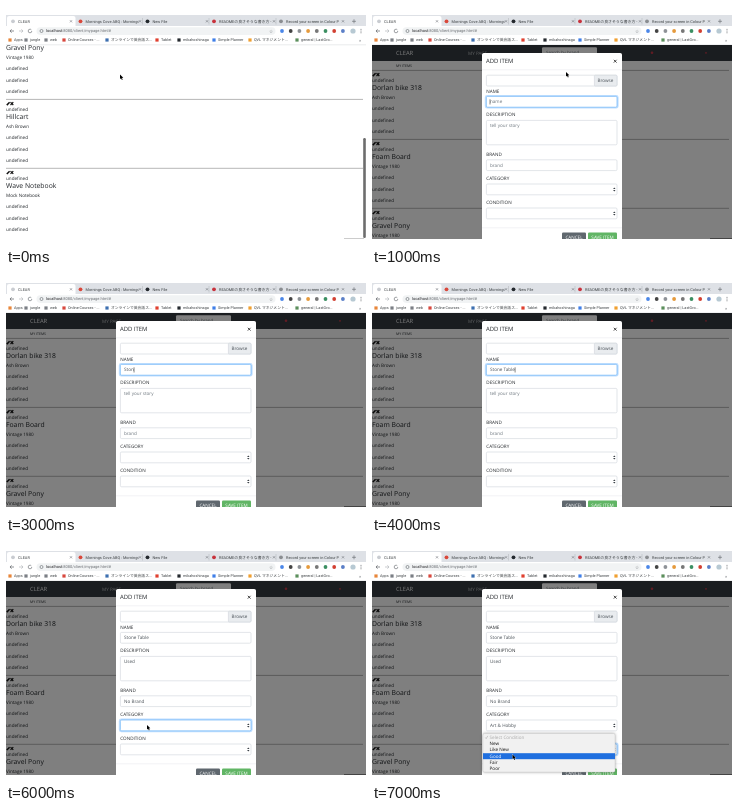
Animation of 360x240 px, one loop 8 s. Source, as an HTML page:

```html
<!DOCTYPE html>
<html lang="en">
<head>
<meta charset="utf-8">
<title>Add item</title>
<style>
html, body { margin: 0; width: 100%; height: 100%; overflow: hidden; background: #fff; }
#stage { display: block; width: 360px; height: 240px; }
text { text-rendering: geometricPrecision; white-space: pre; }
</style>
</head>
<body>
<svg id="stage" viewBox="0 0 360 240">
  <defs>
    <filter id="grain" x="0" y="0" width="1" height="1" color-interpolation-filters="sRGB">
      <feTurbulence type="fractalNoise" baseFrequency="0.85" numOctaves="2" seed="11"/>
      <feColorMatrix values="1.1 .3 .3 0 -.4  .3 1.1 .3 0 -.4  .3 .3 1.1 0 -.4  0 0 0 0 1"/>
    </filter>
  </defs>
  <g id="scene"></g>
</svg>
<script>
const scene = document.getElementById('scene');
let parent = scene;

const PAGE = '"Open Sans", "Noto Sans", sans-serif';
const UI = 'Roboto, "Noto Sans CJK JP", "Noto Sans CJK", sans-serif';
const INK = '#212529';

function add(tag, attributes) {
  const node = document.createElementNS('http://www.w3.org/2000/svg', tag);
  for (const key in attributes) node.setAttribute(key, attributes[key]);
  return parent.appendChild(node);
}

function inside(node, draw) {
  const outer = parent;
  parent = node;
  draw();
  parent = outer;
}

// A nested viewport clips its content
function clipped(x, y, width, height, draw) {
  inside(add('svg', { x, y, width, height, viewBox: `${x} ${y} ${width} ${height}` }), draw);
}

// y is the visual middle of the line; returns the x where the text ends
function text(str, x, y, size = 4.6, fill = INK, font = PAGE, anchor = 'start') {
  const node = add('text', {
    x, y: y + size * 0.34, fill, 'font-size': size, 'font-family': font, 'text-anchor': anchor
  });
  node.textContent = str;
  return x + node.getComputedTextLength();
}

function rect(x, y, width, height, fill) {
  return add('rect', { x, y, width, height, fill });
}

function box(x, y, width, height, rx, fill, stroke, weight = 0.6) {
  return add('rect', {
    x, y, width, height, rx, fill: fill || 'none', stroke: stroke || 'none', 'stroke-width': weight
  });
}

function dot(cx, cy, r, fill) {
  add('circle', { cx, cy, r, fill });
}

function ring(cx, cy, r) {
  return add('circle', { cx, cy, r, fill: 'none', stroke: '#5f6368', 'stroke-width': 0.6 });
}

function line(stroke, weight, ...points) {
  add('polyline', { points: points.join(' '), fill: 'none', stroke, 'stroke-width': weight });
}

function cross(x, y, r, color, weight = 0.6) {
  line(color, weight, x - r, y - r, x + r, y + r);
  line(color, weight, x - r, y + r, x + r, y - r);
}

function triangle(x, y, r, dir, fill) {
  add('polygon', { points: [x - r, y, x + r, y, x, y + dir * r * 1.3].join(' '), fill });
}

function updown(x, y, color = '#343a40') {
  triangle(x, y - 0.5, 1.2, -1, color);
  triangle(x, y + 0.5, 1.2, 1, color);
}

function pointer(x, y) {
  add('path', {
    d: `M${x} ${y}v4.6l1.1-.9 .8 1.7 .8-.4-.8-1.6 1.4-.1z`,
    fill: '#000', stroke: '#fff', 'stroke-width': 0.6, 'paint-order': 'stroke'
  });
}

function beam(x, y) {
  line('#111', 0.7, x, y - 2.4, x, y + 2.4);
  for (const dy of [-2.6, 2.6]) line('#111', 0.6, x - 1.2, y + dy, x + 1.2, y + dy);
}

function shadow(node, blur, alpha) {
  node.style.filter = `drop-shadow(0 0 ${blur}px rgba(0,0,0,${alpha}))`;
}

const TABS = [
  [7, 'CLEAR', '#c9ccd1', 65],
  [74.5, 'Mornings Cove ABQ : Mornings', '#d9483b', 134],
  [141.5, 'New File', '#24292e', 201],
  [208, 'READMEの良さそうな書き方 - Q', '#c8323c', 268],
  [275, 'Record your screen in Colour P', '#8a8d91', 337]
];
const BOOKMARKS = [
  [4, 'Apps', '#e8863a'], [20, 'jungle', '#7b7f85'], [40, 'web', '#7b7f85'],
  [58, 'Online Courses - ...', '#d8483e'], [101, 'オンラインで英会話ス...', '#3d6fb0'],
  [151, 'Tablet', '#e0402f'], [173, 'mikahoshinaga', '#24292e'],
  [208, 'Simple Planner', '#3f7fe8'], [244, 'QVL マネジメント...', '#f0a030'],
  [291, 'general | LastGro...', '#5b8f5c']
];
const EXTENSIONS = ['#4a86e8', '#444', '#8e9297', '#e59a3c', '#777', '#3b8f62', '#d23f31', '#5b7fc7'];

function browser() {
  rect(0, 0, 360, 240, '#fff');
  rect(0, 9, 360, 11, '#dee1e6');
  box(1, 10, 68.5, 13, 2, '#fff');
  rect(0, 20, 360, 19, '#fff');
  for (const [x, label, color, close] of TABS) {
    dot(x, 15.3, 1.9, color);
    clipped(x + 4, 10, 54, 10, () => text(label, x + 5, 15.3, 3.9, '#3c4043', UI));
    cross(close, 15.3, 1.1, '#5f6368', 0.5);
    if (x > 80) line('#a5a8ad', 0.4, x - 5, 12, x - 5, 18.5);
  }
  line('#5f6368', 0.6, 346, 15.3, 350, 15.3);
  line('#5f6368', 0.6, 348, 13.3, 348, 17.3);

  for (const [x, d] of [[6, -1], [15, 1]]) {
    const color = d < 0 ? '#5f6368' : '#b5b8bc';
    line(color, 0.7, x - 2, 25, x + 2, 25);
    line(color, 0.7, x + d * 0.4, 23.3, x + d * 2, 25, x + d * 0.4, 26.7);
  }
  ring(24, 25, 1.8).setAttribute('stroke-dasharray', '9 2.3');
  box(30.5, 21.3, 239, 7.6, 3.8, '#f1f3f4');
  ring(35.5, 25, 1.5);
  const port = text('localhost:', 40, 25, 4, '#202124', UI);
  text('8080/client/mypage.html#', port, 25, 4, '#6a6e73', UI);
  text('☆', 263, 25, 4.6, '#5f6368', '"DejaVu Sans", sans-serif');
  EXTENSIONS.forEach((color, i) => dot(276 + i * 8.7, 25, 1.9, color));
  dot(347, 25, 2.6, '#b7c9d3');
  for (let y = 23.3; y < 27; y += 1.7) dot(355, y, 0.5, '#5f6368');

  for (const [x, label, color] of BOOKMARKS) {
    rect(x - 1.6, 32.4, 3.2, 3.2, color);
    text(label, x + 4, 34, 3.8, '#3c4043', UI);
  }
  text('»', 353, 34, 4.5, '#5f6368', UI);
  line('#d5d7da', 0.5, 0, 38.8, 360, 38.8);
}

function entry(top, title, note) {
  line('#858585', 0.6, 0, top, 357, top);
  line('#111', 1.5, 0.8, top + 5.7, 3.6, top + 2.9);
  cross(5.9, top + 4.2, 1.4, '#111', 1.1);
  text('undefined', 0, top + 10);
  text(title, 0, top + 17.4, 6.8);
  text(note, 0, top + 27.2);
  for (const dy of [38.4, 49.8, 61.2]) text('undefined', 0, top + dy);
}

function scrolledPage() {
  clipped(0, 39, 360, 194, () => {
    entry(24.4, 'Gravel Pony', 'Vintage 1980');
    entry(93.4, 'Hillcart', 'Ash Brown');
    entry(162.3, 'Wave Notebook', 'Mock Notebook');
  });
  box(357.2, 132, 2.6, 100, 1.2, '#6d6d6d');
  rect(338, 232, 20, 1, '#ccc');
}

function dimmedPage() {
  clipped(0, 39, 360, 194, () => {
    entry(64.4, 'Dorlan bike 318', 'Ash Brown');
    entry(133.4, 'Foam Board', 'Vintage 1980');
    entry(202.3, 'Gravel Pony', 'Vintage 1980');
    text('MY ITEMS', 24, 59.4, 3.5);
    rect(0, 39, 360, 16, '#343a40');
    text('CLEAR', 24, 47, 5.8, '#fff');
    text('MY PAGE', 96, 47, 4.6, '#c3c5c8');
    box(170, 41.3, 55, 11, 1.2, '#fff');
    text('Search by brand', 174, 47, 4.4, '#6c757d');
    dot(280, 46.8, 1.3, '#c33745');
    dot(334, 46.8, 0.9, '#c33745');
    rect(0, 39, 360, 194, 'rgba(0,0,0,.5)');
    rect(338, 232, 22, 1, '#444');
  });
}

function field(y, h, value, { hint = '', focus = false, caret = false, select = false } = {}) {
  if (focus) box(113.6, y - 0.6, 132.2, h + 1.2, 1.6, null, '#bfdeff', 1.6);
  box(114.4, y, 130.6, h, 1.2, '#fff', focus ? '#5aa9f5' : '#ced4da');
  const mid = y + 5.5;
  const end = text(value || hint, 118, mid, 4.6, value ? '#495057' : '#6c757d');
  if (caret) {
    const x = value ? end + 0.3 : 118;
    line('#111', 0.5, x, mid - 2.6, x, mid + 2.6);
  }
  if (select) updown(242.3, mid);
}

function modal({ name = '', story = '', brand = '', category = '', focus }) {
  clipped(0, 39, 360, 194, () => {
    box(110, 47, 140, 195, 1.8, '#fff');
    text('ADD ITEM', 114, 55.2, 5.9);
    cross(243.2, 55.2, 1.4, '#333', 0.9);
    line('#e4e7ea', 0.5, 110, 63.8, 250, 63.8);
    box(114.4, 69.2, 130.6, 10.8, 1.2, '#fff', '#ced4da');
    box(222.4, 69.2, 22.6, 10.8, 1, '#e9ecef', '#ced4da');
    text('Browse', 225.5, 74.6, 4.6, '#495057');
    text('NAME', 114.3, 85.3);
    text('DESCRIPTION', 114.3, 108.8);
    text('BRAND', 114.3, 148.8);
    text('CATEGORY', 114.3, 172.5);
    text('CONDITION', 114.3, 196.4);
    field(90.4, 10.8, name, { hint: 'name', focus: focus === 'name', caret: focus === 'name' });
    field(114.4, 24.4, story, { hint: 'tell your story', focus: focus === 'story' });
    field(153.8, 10.8, brand, { hint: 'brand' });
    field(178, 10.8, category, { select: true, focus: focus === 'category' });
    field(202, 10.8, '', { select: true, focus: focus === 'condition' });
    line('#e4e7ea', 0.5, 110, 221.8, 250, 221.8);
    box(190, 226.4, 24, 11, 1.2, '#5f676e');
    text('CANCEL', 202, 231.8, 4.6, '#fff', PAGE, 'middle');
    box(216, 226.4, 29, 11, 1.2, '#61b565');
    text('SAVE ITEM', 230.5, 231.8, 4.6, '#fff', PAGE, 'middle');
  });
}

function conditionMenu() {
  shadow(box(111, 191.5, 132, 38.5, 1.5, '#f1f1f1', '#c4c4c4', 0.4), 1.5, 0.35);
  rect(111, 211.2, 132, 6, '#1f6fdf');
  line('#aaa', 0.6, 113.3, 195.5, 114.2, 196.6, 115.8, 193.9);
  ['Select Condition', 'New', 'Like New', 'Good', 'Fair', 'Poor'].forEach((label, i) =>
    text(label, 117.6, 195.4 + i * 6.2, 4.6, i === 0 ? '#aaa' : i === 3 ? '#fff' : '#111'));
}

const FILES = [
  'python-beginner', 'python-pro', 'Q2a_RWS_...ng_Student', 'Q3a_RWS_...umstate', 'Q3a_RWS_WritingTools',
  'react & redux', 'react-native-babuseka', 'react-udemy', 'RISK_DATA...28786.dat', 'sdunday...in1200.JPG',
  'Scannable...ment 3.jpg', 'Scannable...ent 8.jpg', 'Scannable...ent 9.png', 'Scannable..._13_48.pdf',
  'Scannable..._20_45.pdf', 'Scannable..._04_24.pdf', 'Scannable...ument.png', 'tenor.gif', 'test',
  'UCSC App...o Form.pdf', 'weblab_db', 'wired'
];
const TAGGED = [0, 1, 5, 7];
const SIDEBAR = [
  [23, 'Favorites'], [29.5, 'Recents', 1], [36.3, 'hoshinagamikage', 1], [43.2, 'Applications', 1],
  [50.2, 'Downloads', 1], [57.5, 'Inventive Drive...', 1], [71, 'Devices'], [82, 'Media'],
  [88.3, 'Music', 1], [95.3, 'Photos', 1], [102.3, 'Movies', 1]
];
const OPENED = 'August 23, 2018 at 10:51';
const DETAILS = [
  ['Created', OPENED], ['Modified', OPENED], ['Last opened', OPENED], ['Dimensions', '498 × 498']
];

function button(x, y, w, h, label, primary) {
  box(x, y, w, h, 1.2, primary ? '#2e83f4' : '#fff', primary ? '#2270dc' : '#c2c2c2', 0.4);
  text(label, x + w / 2, y + h / 2, 4, primary ? '#fff' : '#222', UI, 'middle');
}

function fileDialog() {
  shadow(box(78.5, 8.5, 206.5, 131, 1.2, '#ececec'), 3, 0.5);
  button(82.5, 10, 6.5, 6.3, '‹');
  button(89, 10, 6.5, 6.3, '›');
  for (let i = 0; i < 3; i++) {
    box(100 + i * 7, 10, 7, 6.3, 0.6, i === 1 ? '#777' : '#fff', '#c2c2c2', 0.4);
    for (let k = 0; k < 3; k++) rect(101.6 + i * 7 + k * 1.4, 11.7, 0.7, 3, i === 1 ? '#fff' : '#666');
  }
  button(125, 10, 12, 6.3, '▦ ▾');
  box(151, 10, 62, 6.3, 1, '#fff', '#c2c2c2', 0.4);
  rect(153, 11.6, 3.2, 3, '#58b4e5');
  text('Downloads', 158, 13.2, 4, '#222', UI);
  updown(210, 13.2);
  box(243, 10, 38, 6.3, 1, '#fff', '#c2c2c2', 0.4);
  dot(246, 13.1, 1, '#999');
  text('Search', 249, 13.2, 4, '#888', UI);

  rect(78.5, 18, 43.5, 110, '#e3e3e5');
  rect(78.5, 46.8, 43.5, 6.8, '#c9c9cc');
  clipped(78.5, 18, 43, 110, () => {
    for (const [y, label, item] of SIDEBAR) {
      if (item) box(83.5, y - 1.5, 3.2, 3, 0.5, null, '#666', 0.6);
      text(label, item ? 90 : 81, y, item ? 4 : 3.7, item ? '#333' : '#85858a', UI);
    }
  });

  rect(122, 18, 163, 110, '#fff');
  FILES.forEach((name, i) => {
    const y = 20 + i * 5.1;
    const chosen = name === 'tenor.gif';
    const folder = i < 8 || (i > 17 && i !== 19);
    if (chosen) rect(122, y - 2.6, 62, 5.2, '#1761d8');
    rect(124, y - 1.5, folder ? 4 : 3, 3.1, folder ? '#62b9e9' : '#c6c8cb');
    text(name, 130, y, 3.9, chosen ? '#fff' : '#222', UI);
    if (TAGGED.includes(i)) dot(174, y, 1.4, '#f2574f');
    if (folder) triangle(181, y - 0.5, 0.9, 1, '#777');
  });
  line('#d0d0d0', 0.5, 184.8, 18, 184.8, 128);
  rect(202, 20, 58, 58, '#777').setAttribute('filter', 'url(#grain)');
  text('tenor.gif', 202, 85, 6, '#222', UI);
  text('GIF image - 1.4 MB', 262, 94.2, 3.7, '#888', UI, 'end');
  DETAILS.forEach(([label, value], i) => {
    const y = 99.8 + i * 4.8;
    text(label, 221.5, y, 3.7, '#888', UI, 'end');
    text(value, 223.5, y, 3.7, '#222', UI);
  });
  text('Add Tags...', 223.5, 119, 3.7, '#3a7ee0', UI);
  line('#cfcfcf', 0.5, 78.5, 128, 285, 128);
  button(82.5, 130.7, 21, 6.4, 'Options');
  button(232.5, 130.7, 22, 6.4, 'Cancel');
  button(257, 130.7, 22, 6.4, 'Open', true);
}

function form(values, extra) {
  dimmedPage();
  modal(values);
  if (extra) extra();
}

const name = 'Stone Table';
const story = 'Used';
const brand = 'No Brand';
const SCENES = [
  () => { scrolledPage(); pointer(114, 68.5); },
  () => form({ focus: 'name' }, () => pointer(194, 66)),
  () => form({}, () => { fileDialog(); pointer(149, 104.5); }),
  () => form({ name: name.slice(0, 4), focus: 'name' }),
  () => form({ name, focus: 'name' }),
  () => form({ name, story, focus: 'story' }, () => beam(140.5, 158.5)),
  () => form({ name, story, brand, focus: 'category' }, () => pointer(141, 183)),
  () => form({ name, story, brand, category: 'Art & Hobby', focus: 'condition' },
    () => { conditionMenu(); pointer(140.5, 212.5); })
];

let shown = -1;
function tick() {
  const index = Math.floor((performance.now() % 8000) / 1000);
  if (index !== shown) {
    shown = index;
    scene.replaceChildren();
    browser();
    SCENES[index]();
  }
  requestAnimationFrame(tick);
}
tick();
</script>
</body>
</html>
```
